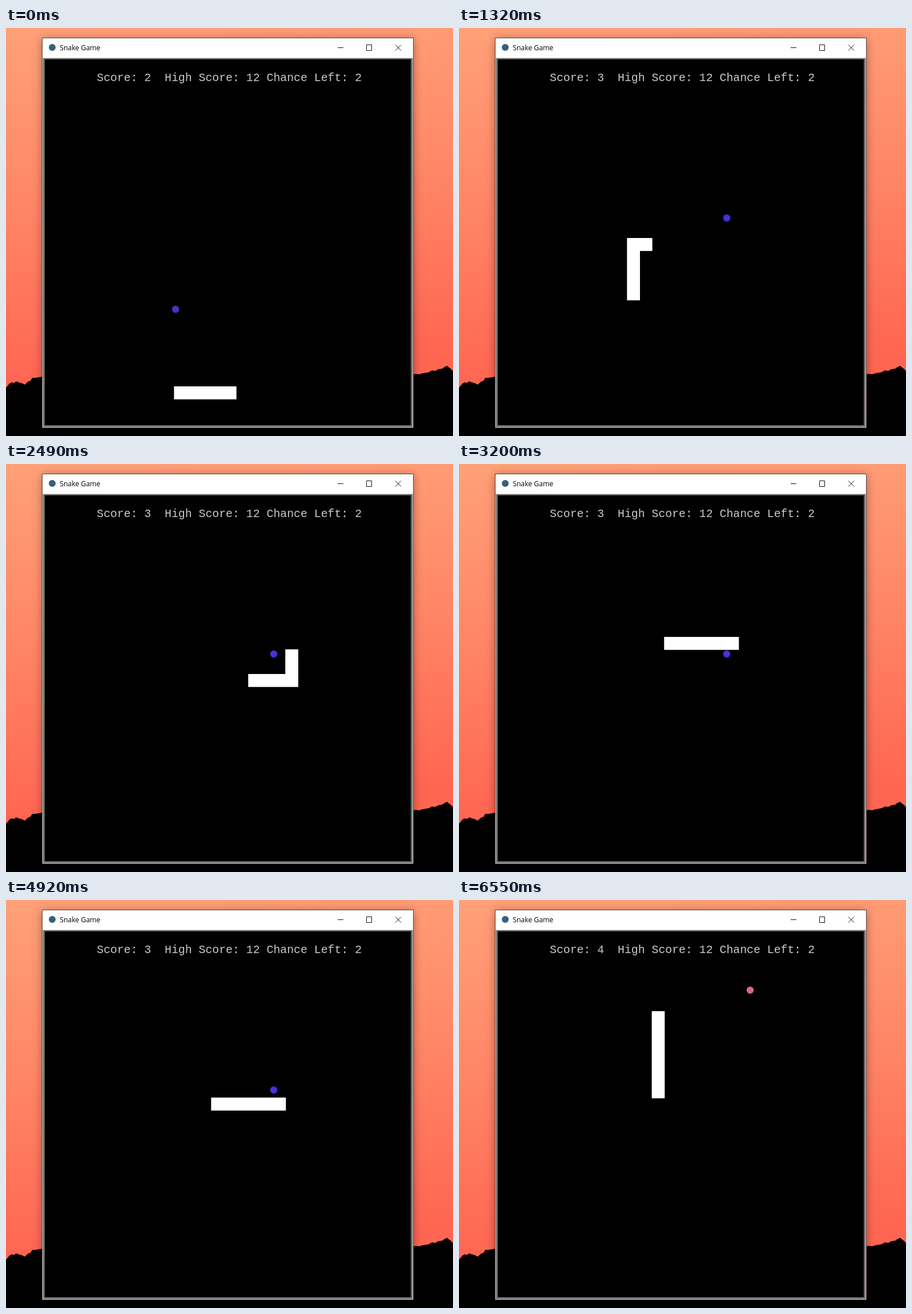
Write an HTML page that moves like this. It is 783 by 715 pixels and loops after 6620 ms.

```html
<!DOCTYPE html>
<html lang="en">
<head>
<meta charset="utf-8">
<title>Snake Game</title>
<style>
  html, body { margin: 0; width: 100%; height: 100%; overflow: hidden; background: #000; }
  svg { display: block; width: 783px; height: 715px; }
  .window { filter: drop-shadow(0 3px 8px rgba(0, 0, 0, .4)); }
  .crisp { shape-rendering: crispEdges; }
  .title { font: 12.2px "Open Sans", "Noto Sans", sans-serif; }
  .score { font: 19.84px "Liberation Mono", monospace; fill: #cacaca; white-space: pre; }
  .buttons { fill: none; stroke: #111; }
  #snake { fill: none; stroke: #fff; stroke-width: 22.7; stroke-linecap: square; stroke-linejoin: miter; }
</style>
</head>
<body>
<svg viewBox="0 0 783 715">
  <defs>
    <linearGradient id="sky" gradientUnits="userSpaceOnUse" x1="0" y1="0" x2="50" y2="620">
      <stop offset="0" stop-color="#ffa078"/>
      <stop offset=".5" stop-color="#ff8667"/>
      <stop offset="1" stop-color="#ff6652"/>
    </linearGradient>
  </defs>
  <rect width="783" height="715" fill="url(#sky)"/>
  <rect class="window" x="64" y="17" width="649" height="683"/>
  <path d="M0 630L3 627 6 623 10 621 14 622 18 619 22 621 27 622 33 625 38 620 43 618 46 613 52 613 58 612 64 611V700H713V607L718 606 723 607 730 605 736 604 741 603 746 600 752 601 757 598 764 597 768 594 773 592 776 595 779 597 783 601V715H0Z"/>

  <g class="crisp">
    <rect x="63" y="17" width="651" height="684" fill="#5d4641"/>
    <rect x="64" y="18" width="649" height="682" fill="#d4d4d4"/>
    <rect x="64" y="18" width="649" height="34" fill="#fff"/>
    <rect x="65" y="53" width="647" height="646" fill="#6a6a6a"/>
    <rect x="68" y="55" width="641" height="641"/>
  </g>
  <circle cx="81" cy="34" r="6" fill="#35607c"/>
  <text class="title" x="94.2" y="39">Snake Game</text>
  <g class="buttons">
    <path d="M581 34.5H591M631.5 29.5H640.5V39.5H631.5Z"/>
    <path d="M682 29.5L692 39.5M692 29.5L682 39.5"/>
  </g>

  <text class="score" x="159" y="92.8" xml:space="preserve">Score: <tspan id="points">2</tspan>  High Score: 12 Chance Left: 2</text>
  <circle id="food" r="6.2"/>
  <polyline id="snake"/>
</svg>
<script>
const LOOP = 6620, CELL = 21.66, ORIGIN = [284, 314.4];

// How long the snake rests after each move, in ms
const holds = [
  60, 80, 150, 80, 80, 150, 80, 160, 80, 80,
  170, 80, 70, 160, 70, 80, 150, 80, 80, 150,
  150, 80, 170, 70, 80, 160, 80, 80, 160, 80,
  150, 80, 160, 80, 80, 160, 80, 150, 80, 150,
  80, 150, 80, 160, 80, 80, 150, 80, 150, 80,
  80, 160, 50, 150, 80, 150, 80, 150, 80, 110, 70
];

const dirs = { U: [0, -1], D: [0, 1], L: [-1, 0], R: [1, 0] };
const route = "L4 U12 R9 U3 L10 D2 R10 U1 L7 U6";
const startLength = 5;

const cells = [[5, 15]];
for (const leg of route.split(" ")) {
  const [dx, dy] = dirs[leg[0]];
  for (let i = 0; i < +leg.slice(1); i++) {
    const [x, y] = cells[cells.length - 1];
    cells.push([x + dx, y + dy]);
  }
}

// Each meal is eaten on the given move; the next one appears a move later
const meals = [
  { x: 297, y: 493, color: "#5231c0", eaten: 6 },
  { x: 469, y: 333, color: "#4333dc", eaten: 48 },
  { x: 510, y: 158, color: "#d9658d", eaten: Infinity }
];

const byId = id => document.getElementById(id);
const points = byId("points"), food = byId("food"), snake = byId("snake");
const toPixels = cell => cell.map((v, i) => (ORIGIN[i] + v * CELL).toFixed(2)).join();

function moveAt(time) {
  let move = 0;
  while (move < holds.length - 1 && time >= holds[move]) time -= holds[move++];
  return move;
}

function draw(move) {
  const scored = meals.filter(m => move >= m.eaten).length;
  const grown = meals.filter(m => move > m.eaten).length;
  const meal = meals[grown];
  const head = move + startLength;
  points.textContent = 2 + scored;
  food.setAttribute("cx", meal.x);
  food.setAttribute("cy", meal.y);
  food.setAttribute("fill", meal.color);
  snake.setAttribute("points", cells.slice(head - startLength - grown, head).map(toPixels).join(" "));
}

const start = performance.now();
let shown = -1;
function tick() {
  const move = moveAt((performance.now() - start) % LOOP);
  if (move !== shown) draw(shown = move);
  requestAnimationFrame(tick);
}
tick();
</script>
</body>
</html>
```
